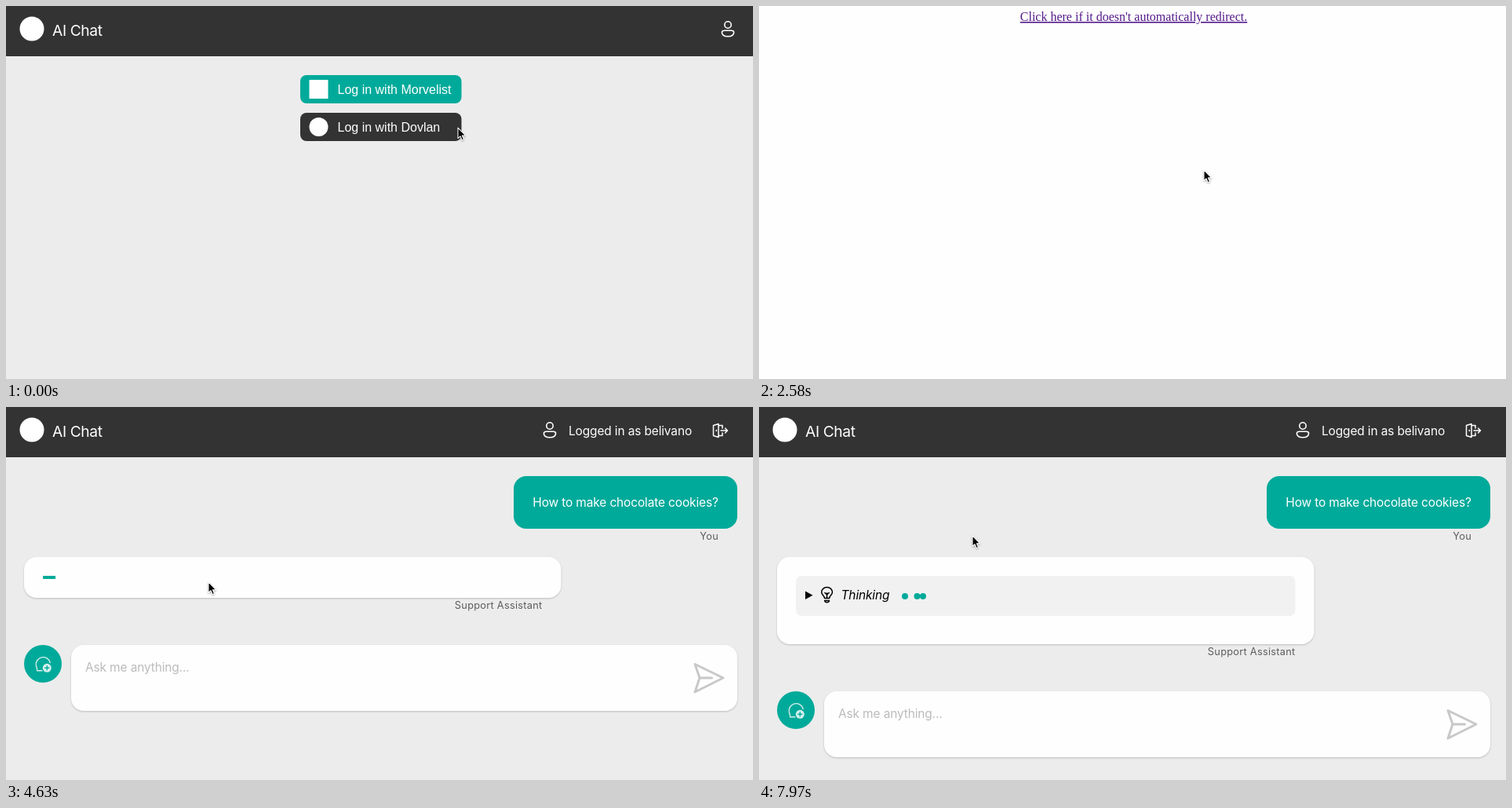
Animation of 952 by 475 pixels, one loop 8000 ms. Source, as an HTML page:

```html
<!DOCTYPE html>
<html lang="en">
<head>
<meta charset="utf-8">
<title>AI Chat</title>
<style>
  html, body { margin: 0; width: 100%; height: 100%; overflow: hidden; background: #ececec; }
  svg { display: block; width: 100vw; height: 100vh; }
  text { font-family: Inter, "Open Sans", sans-serif; font-size: 15.5px; letter-spacing: -.01em; }
  .sans { font-family: "Liberation Sans", Arial, sans-serif; font-size: 16px; letter-spacing: 0; }
  .serif { font-family: "Liberation Serif", Times, serif; font-size: 16px; letter-spacing: 0; text-decoration: underline; }
  .brand { font-size: 19.3px; letter-spacing: -.022em; }
  .title { font-size: 23px; font-weight: 700; letter-spacing: -.018em; }
  .label { font-size: 12.8px; letter-spacing: .02em; fill: #5c5c5c; }
  .mid { text-anchor: middle; }
  .end { text-anchor: end; }
  .white { fill: #fff; }
  .line { fill: none; stroke-linecap: round; stroke-linejoin: round; }
  .raised { filter: drop-shadow(0 1.5px 1.2px rgba(0, 0, 0, .2)); }
  .card { filter: drop-shadow(0 2px 2px rgba(0, 0, 0, .13)); }
</style>
</head>
<body>
<svg viewBox="0 0 952 475">
  <rect id="page" width="952" height="475" fill="#ececec"/>

  <g id="header">
    <rect width="952" height="64" fill="#333"/>
    <circle cx="33" cy="29" r="15.5" class="white"/>
    <text x="59" y="38" class="brand white">AI Chat</text>
    <g id="user" class="line" stroke="#fff" stroke-width="1.6">
      <circle cy="-5" r="4.2"/>
      <path d="M-4.6 2.2H4.6C6.4 2.2 7.6 3.2 7.6 4.6C7.6 8 4.6 9.8 0 9.8S-7.6 8-7.6 4.6C-7.6 3.2-6.4 2.2-4.6 2.2Z"/>
    </g>
    <g id="account">
      <text x="717" y="36" class="white">Logged in as belivano</text>
      <g class="line" stroke="#fff" stroke-width="1.5">
        <path d="M901.5 23.5L908 21.5V38.5L901.5 36.5ZM908 23.5H913V27M908 36.5H913V33M911 30H919.5M916.5 27L919.5 30L916.5 33"/>
        <path d="M905.3 29.5V30.5"/>
      </g>
    </g>
  </g>

  <g id="login">
    <rect x="375" y="88" width="205.500" height="36" rx="8" fill="#00aa9a"/>
    <rect x="386.500" y="94" width="24" height="24" class="white"/>
    <text x="422.500" y="111.500" class="sans white">Log in with Morvelist</text>
    <rect id="dark" x="375" y="136" width="205.500" height="36" rx="8"/>
    <circle cx="398.500" cy="154" r="12" class="white"/>
    <text x="422.500" y="159.500" class="sans white">Log in with Dovlan</text>
  </g>

  <text id="redirect" x="477.500" y="19" class="serif mid" fill="#551a8b">Click here if it doesn't automatically redirect.</text>

  <g id="start">
    <text x="477.500" y="131" class="title mid">Ask anything or try an example</text>
    <g id="halos" fill="#e3e3e3"></g>
    <g id="cards"></g>
    <rect id="ring" y="155" width="297" height="87" rx="17" fill="none" stroke="#00aa9a" stroke-width="2"/>
    <g class="sans mid">
      <text x="170.500" y="203.500" class="sans">How to make chocolate cookies?</text>
      <text x="477.500" y="194.500" class="sans">What ingredients do I need for a</text>
      <text x="477.500" y="213" class="sans">banana cake?</text>
      <text x="784.500" y="203.500" class="sans">Is bread gluten-free?</text>
    </g>
  </g>

  <g id="chat">
    <g id="question">
      <rect x="647" y="88" width="285" height="67" rx="16" fill="#00aa9a"/>
      <text x="789.500" y="127" class="mid white">How to make chocolate cookies?</text>
      <text x="908" y="169" class="label end">You</text>
    </g>
    <rect id="bubble" x="23" y="191" width="684.500" rx="16" fill="#fefefe" class="raised"/>
    <text id="assistant" x="683.500" class="label end">Support Assistant</text>
    <rect id="loader" y="215" height="4" rx="1" fill="#00aa9a"/>
    <g id="thinking">
      <rect x="47" y="215" width="636.500" height="51" rx="7" fill="#f1f1f1"/>
      <path d="M59 234.500L68.500 239.700L59 245Z"/>
      <g class="line" stroke="#000" stroke-width="1.500">
        <path d="M83.500 243.500C83.500 240.500 79.700 239.500 79.700 235.800A6.900 6.300 0 0 1 93.500 235.800C93.500 239.500 89.700 240.500 89.700 243.500Z"/>
        <path d="M83.700 246.500C84 249.500 89.200 249.500 89.500 246.500ZM86.600 243V237M86.600 239L84 236.500M86.600 239L89.200 236.500"/>
      </g>
      <text x="104.500" y="245" font-style="italic">Thinking</text>
      <g id="dots" fill="#00aa9a"></g>
    </g>
  </g>

  <g id="composer">
    <circle cx="47" cy="24" r="24" fill="#00aa9a"/>
    <path d="M39.500 31.500C40 30.500 39 28.500 38.500 27A9 9 0 1 1 56.200 22.500M39.500 32.800H46" class="line" stroke="#d4efec" stroke-width="1.400"/>
    <circle cx="52.300" cy="29.300" r="5.500" fill="#d4efec"/>
    <path d="M49.300 29.300H55.300M52.300 26.300V32.300" stroke="#00aa9a" stroke-width="1.400"/>
    <rect x="83" width="849" height="84" rx="16" fill="#fefefe" class="raised"/>
    <text id="hint" x="101" y="33.500">Ask me anything...</text>
    <path d="M878 24.500L914 42L878 60L884 42ZM884 42H899.500" class="line" stroke="#c8c8c8" stroke-width="3"/>
  </g>

  <g id="cursor">
    <path d="M0 0V14.200L3.200 11.300L5.500 16.500L7.900 15.500L5.700 10.400H10.200Z" fill="#000" stroke="#fff" stroke-width="1.100"
      stroke-linejoin="round" style="filter: drop-shadow(0 1px 1px rgba(0, 0, 0, .35))"/>
  </g>
</svg>

<script>
const LOOP = 8000, REDIRECT = 2580, HOME = 2850, CHAT = 4263, THINK = 7450;
const LOAD_START = 4232, LOAD_TIME = 2000;
const $ = id => document.getElementById(id);
const clamp = v => Math.min(1, Math.max(0, v));
const mix = (a, b, k) => a + (b - a) * k;
const show = (id, on) => $(id).setAttribute('display', on ? 'inline' : 'none');

function set(node, attrs) {
  for (const key in attrs) node.setAttribute(key, attrs[key]);
  return node;
}

function add(parent, tag, attrs) {
  const node = document.createElementNS('http://www.w3.org/2000/svg', tag);
  return $(parent).appendChild(set(node, attrs));
}

function bezier(x1, y1, x2, y2) {
  const at = (a, b, s) => 3 * (1 - s) ** 2 * s * a + 3 * (1 - s) * s * s * b + s ** 3;
  return x => {
    let low = 0, high = 1;
    for (let i = 0; i < 24; i++) {
      const s = (low + high) / 2;
      if (at(x1, x2, s) < x) low = s; else high = s;
    }
    return at(y1, y2, low);
  };
}
const ease = bezier(.25, .1, .25, 1);
const snap = bezier(.85, 0, .15, 1);

const cardX = [23, 330, 637];
for (const x of cardX) {
  add('halos', 'rect', { x: x - 5, y: 164, width: 305, height: 87.5, rx: 22 });
  add('cards', 'rect', { x, y: 156, width: 295, height: 85, rx: 16, fill: '#fefefe', class: 'card' });
}
const dots = [182, 195.5, 209].map(cx => add('dots', 'circle', { cx, cy: 241, r: 4 }));

// Pointer path: time, x, y
const path = [
  [0, 576, 155], [300, 564, 170], [520, 552, 160], [1160, 552, 160],
  [1300, 549, 164], [1420, 555, 165], [1790, 555, 165], [2200, 567, 209],
  [3110, 567, 209], [3200, 563, 210], [3300, 562, 230], [3380, 560, 249],
  [3620, 450, 305], [3920, 285, 245], [4100, 258, 223], [5000, 258, 223],
  [5700, 272, 164], [LOOP, 272, 164]
];

function pointer(t) {
  const i = path.findIndex(p => p[0] > t);
  const [a, b] = [path[i - 1], path[i]];
  const k = (t - a[0]) / (b[0] - a[0]);
  return [mix(a[1], b[1], k), mix(a[2], b[2], k)];
}

function drawLoader(t) {
  const phase = (t - LOAD_START) / LOAD_TIME % 1;
  const growing = phase < .5;
  const width = 100 * (growing ? snap(phase / .5) : 1 - snap(clamp((phase - .51) / .49)));
  set($('loader'), { x: growing ? 47 : 147 - width, width });
}

function draw(t) {
  const redirect = t >= REDIRECT && t < HOME;
  const home = t >= HOME, chat = t >= CHAT, think = t >= THINK;

  $('page').setAttribute('fill', redirect ? '#fefefe' : '#ececec');
  show('header', !redirect);
  show('account', home);
  show('login', t < REDIRECT);
  show('redirect', redirect);
  show('start', home && !chat);
  show('chat', chat);
  show('composer', home);
  set($('user'), { transform: `translate(${home ? 693 : 920} 29)` });

  const shade = Math.round(mix(51, 3, clamp((t - 1820) / 300)));
  set($('dark'), { fill: `rgb(${shade},${shade},${shade})` });

  show('ring', t < 3460 || t > 3900);
  set($('ring'), { x: cardX[t < 3460 ? 1 : 0] - 1 });

  const rise = ease(clamp((t - CHAT) / 300));
  set($('question'), { transform: `translate(0 ${100 * (1 - rise)})`, opacity: .5 + .5 * rise });
  set($('bubble'), { height: think ? 111 : 52 });
  set($('assistant'), { y: think ? 316 : 257 });
  set($('composer'), { transform: `translate(0 ${think ? 362 : chat ? 303 : 325})` });
  set($('hint'), { fill: chat ? '#bbb' : '#a6a6a6' });

  show('loader', chat && !think);
  show('thinking', think);
  if (chat) drawLoader(t);
  const drift = Math.max(0, (t - 7600) / 370);
  set(dots[0], { cx: 182 + 4 * drift });
  set(dots[1], { cx: 195.5 + 6 * drift });

  set($('cursor'), { transform: `translate(${pointer(t)}) scale(.95)` });
}

const began = performance.now();
function tick() {
  draw((performance.now() - began) % LOOP);
  requestAnimationFrame(tick);
}
draw(0);
requestAnimationFrame(tick);
</script>
</body>
</html>
```
